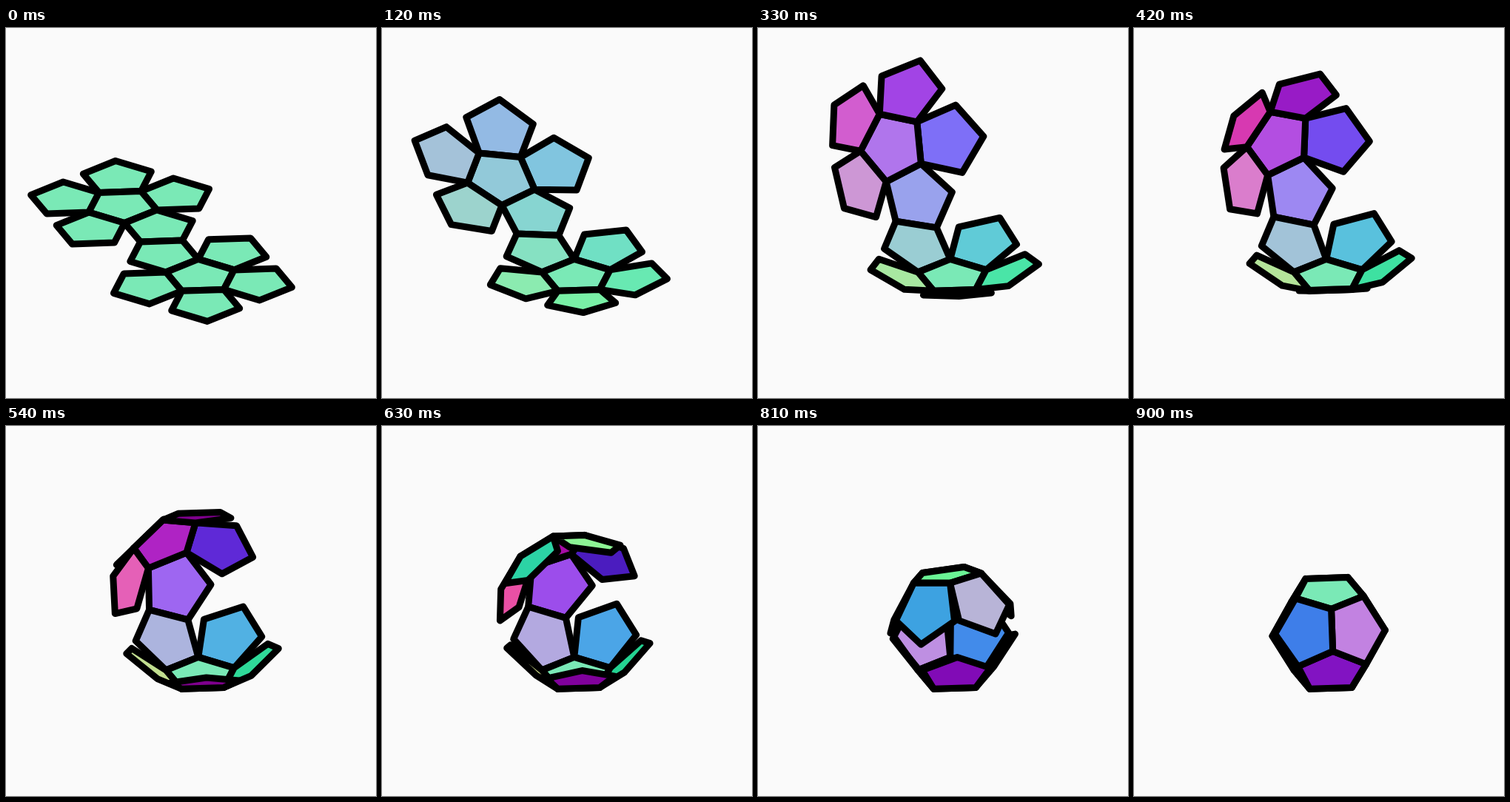
Animation of 500 by 500 pixels, one loop 0.93 s. Source, as an HTML page:

```html
<!DOCTYPE html>
<html lang="en">
<head>
<meta charset="utf-8">
<title>Folding dodecahedron</title>
<style>
  html, body { margin: 0; width: 100%; height: 100%; overflow: hidden; background: #fafafa; }
  svg { display: block; width: 100%; height: 100%; }
  polygon { stroke: #000; stroke-width: 9; stroke-linejoin: round; }
</style>
</head>
<body>
<svg id="stage" viewBox="0 0 500 500"></svg>
<script>
const STEP = 30, STEPS = 31;
const RADIUS = 48.5, APOTHEM = RADIUS * Math.cos(Math.PI / 5);
const FULL_FOLD = Math.PI - Math.acos(-1 / Math.sqrt(5));
const TURN = -4;
const ORIGIN = { x: 263.2, y: 335.6 };
const TILT_SIN = 0.48, TILT_COS = Math.sqrt(1 - TILT_SIN ** 2);

// Plane coordinates: u right, v towards the viewer, h up.
const heading = deg => {
  const a = deg * Math.PI / 180;
  return { u: Math.sin(a), v: -Math.cos(a) };
};

const faces = [];

function addFace(parent, dir) {
  const face = { parent, u: 0, v: 0, spin: TURN };
  if (parent) {
    const d = heading(dir + TURN);
    face.dir = d;
    face.hinge = { u: parent.u + APOTHEM * d.u, v: parent.v + APOTHEM * d.v };
    face.u = parent.u + 2 * APOTHEM * d.u;
    face.v = parent.v + 2 * APOTHEM * d.v;
    face.spin = parent.spin + 180;
  }
  face.corners = [0, 1, 2, 3, 4].map(k => {
    const d = heading(face.spin + 72 * k);
    return { u: face.u + RADIUS * d.u, v: face.v + RADIUS * d.v, h: 0 };
  });
  faces.push(face);
  return face;
}

const base = addFace(null, 0);
for (const dir of [36, 108, 180, 252]) addFace(base, dir);
const lid = addFace(addFace(addFace(base, -36), 0), -36);
for (const dir of [0, 72, 216, 288]) addFace(lid, dir);

// Turn a flat point about each hinge on the way back to the base.
function fold(point, face, angle) {
  let { u, v, h } = point;
  const c = Math.cos(angle), s = Math.sin(angle);
  for (let f = face; f.parent; f = f.parent) {
    const out = (u - f.hinge.u) * f.dir.u + (v - f.hinge.v) * f.dir.v;
    const shift = out * c - h * s - out;
    h = out * s + h * c;
    u += shift * f.dir.u;
    v += shift * f.dir.v;
  }
  return { u, v, h };
}

const project = ({ u, v, h }) => ({
  x: ORIGIN.x + u,
  y: ORIGIN.y + TILT_SIN * v - TILT_COS * h,
  z: TILT_COS * v + TILT_SIN * h
});

// Colour from the normal that faces the viewer.
function shade([p, q, r]) {
  const a = { x: q.x - p.x, y: q.y - p.y, z: q.z - p.z };
  const b = { x: r.x - p.x, y: r.y - p.y, z: r.z - p.z };
  const n = [a.y * b.z - a.z * b.y, a.x * b.z - a.z * b.x, a.x * b.y - a.y * b.x];
  const len = Math.hypot(...n) * (n[2] < 0 ? -1 : 1);
  return `rgb(${n.map(k => Math.round(122 + 126 * k / len)).join()})`;
}

const stage = document.getElementById("stage");
const slots = faces.map(() =>
  stage.appendChild(document.createElementNS("http://www.w3.org/2000/svg", "polygon")));

function draw(ms) {
  const step = Math.floor(ms / STEP) % STEPS;
  const angle = FULL_FOLD * step / (STEPS - 1);
  faces
    .map(face => {
      const pts = face.corners.map(p => project(fold(p, face, angle)));
      return { pts, depth: pts.reduce((sum, p) => sum + p.z, 0) };
    })
    .sort((a, b) => a.depth - b.depth)
    .forEach(({ pts }, i) => {
      slots[i].setAttribute("points", pts.map(p => `${p.x.toFixed(2)},${p.y.toFixed(2)}`).join(" "));
      slots[i].setAttribute("fill", shade(pts));
    });
}

let start;
function tick(now) {
  start ??= now;
  draw(now - start);
  requestAnimationFrame(tick);
}
draw(0);
requestAnimationFrame(tick);
</script>
</body>
</html>
```
